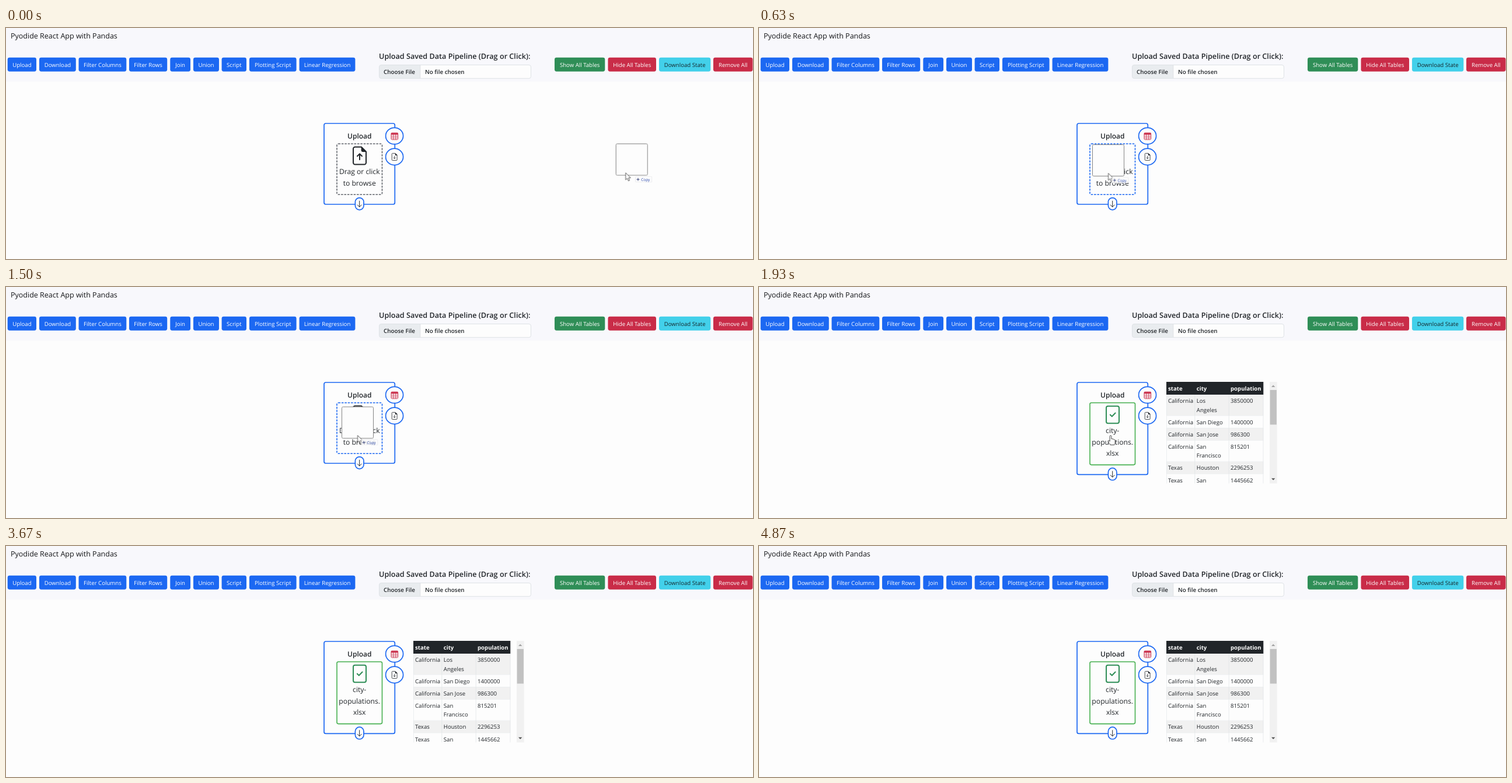
An HTML page that plays this animation: 1280 by 397 pixels, repeating every 4910 ms.

```html
<!DOCTYPE html>
<html lang="en">
<head>
<meta charset="utf-8">
<title>Data pipeline upload</title>
<style>
  html, body { margin: 0; width: 100%; height: 100%; overflow: hidden; background: #fdfdfd; }
  svg { display: block; width: 100%; height: 100%; }
  svg { --blue: #1c68f2; --green: #2f8e57; --red: #c92c48; --cyan: #42d0ea; --ink: #212529; --paper: #fdfdfd; }
  text { font-family: "Open Sans", "Noto Sans", sans-serif; fill: var(--ink); text-rendering: geometricPrecision; white-space: pre; }
  .mid { text-anchor: middle; }
  .semi { font-weight: 600; }
  .card-text { font-size: 12.15px; }
  .small { font-size: 9.65px; }
  .outline { fill: var(--paper); stroke: var(--blue); stroke-width: 1.7; }
  .line { fill: none; stroke: currentColor; stroke-linecap: round; stroke-linejoin: round; }
  .drop { fill: none; stroke-width: 1.6; }

  .before, .after, .zone, .ghost, .pointer, .arrow, .hand { animation: 4910ms infinite; }
  .before { animation-name: before; animation-timing-function: step-end; }
  .after  { animation-name: after;  animation-timing-function: step-end; }
  .zone   { animation-name: zone;   animation-timing-function: step-end; }
  .arrow  { animation-name: arrow;  animation-timing-function: step-end; }
  .hand   { animation-name: hand;   animation-timing-function: step-end; }
  .ghost  { animation-name: ghost; }
  .pointer { animation-name: pointer; }

  @keyframes before { 0% { opacity: 1 } 31.9%, 100% { opacity: 0 } }
  @keyframes after  { 0% { opacity: 0 } 31.9%, 100% { opacity: 1 } }
  @keyframes zone   { 0% { stroke: #62666d } 7.1%, 100% { stroke: #1c68f2 } }
  @keyframes arrow  { 0% { opacity: 1 } 31.9% { opacity: 0 } 68.9%, 100% { opacity: 1 } }
  @keyframes hand   { 0% { opacity: 0 } 31.9% { opacity: 1 } 68.9%, 100% { opacity: 0 } }
  @keyframes ghost {
    0% { transform: translate(1045px, 198.5px); animation-timing-function: cubic-bezier(.35, .12, .25, 1) }
    11.7%, 13% { transform: translate(571px, 200px); animation-timing-function: ease-in-out }
    30%, 100% { transform: translate(575px, 205.5px) }
  }
  @keyframes pointer {
    0% { transform: translate(1062px, 248.7px); animation-timing-function: cubic-bezier(.35, .12, .25, 1) }
    11%, 12.8% { transform: translate(598.5px, 249.5px); animation-timing-function: ease-in-out }
    29.5%, 39.5% { transform: translate(602.5px, 255px); animation-timing-function: ease-in-out }
    59.5%, 66.4% { transform: translate(602.5px, 252.7px); animation-timing-function: ease-in }
    73.3%, 100% { transform: translate(618px, -30px) }
  }
</style>
</head>
<body>
<svg viewBox="0 0 1280 397" preserveAspectRatio="none">
  <defs>
    <clipPath id="view"><rect x="698" y="163" width="167" height="174.5"/></clipPath>
    <g id="pill">
      <rect class="outline" x="598.4" y="291.8" width="14.6" height="20.8" rx="7.3"/>
      <path class="line" d="M605.7 297.3v10M602.2 304l3.5 3.5 3.5-3.5"/>
    </g>
    <g id="sheet">
      <path class="line" d="M9.5 .5H4A1.5 1.5 0 0 0 2.5 2v12A1.5 1.5 0 0 0 4 15.5h8a1.5 1.5 0 0 0 1.5-1.5V4.5z"/>
      <path fill="currentColor" d="M9.3 .2 14 4.8h-3.2a1.5 1.5 0 0 1-1.5-1.5z"/>
    </g>
  </defs>

  <rect width="1280" height="397" fill="#fdfdfd"/>
  <rect width="1280" height="92" fill="#f8f8fc"/>
  <text x="8" y="17.6" font-size="12.5" style="fill:#141517">Pyodide React App with Pandas</text>
  <g id="buttons"></g>

  <text class="semi" x="639" y="53.3" font-size="12.65">Upload Saved Data Pipeline (Drag or Click):</text>
  <rect x="639.5" y="63.5" width="260" height="23.2" rx="3.5" fill="#fdfdfd"/>
  <path d="M710 63.5H643a3.5 3.5 0 0 0-3.5 3.5v16.2a3.5 3.5 0 0 0 3.5 3.5h67z" fill="#e9ecef"/>
  <path d="M709.8 63.5v23.2" stroke="#dee2e6"/>
  <rect x="639.5" y="63.5" width="260" height="23.2" rx="3.5" fill="none" stroke="#dee2e6"/>
  <text class="semi" x="647" y="79" font-size="9.85">Choose File</text>
  <text class="semi" x="718" y="79" font-size="9.9">No file chosen</text>

  <g class="before">
    <rect class="outline" x="545" y="164" width="121.3" height="139" rx="3"/>
    <rect class="drop zone" x="567" y="199" width="77.5" height="87.3" rx="2.5" stroke-dasharray="3.6 1.8"/>
    <g transform="translate(590 203.5) scale(2)" color="#212529">
      <use href="#sheet"/>
      <path class="line" d="M8 11.4V6.5M6 8.4l2-2 2 2"/>
    </g>
    <text class="mid card-text" x="605.7" y="251.3">Drag or click</text>
    <text class="mid card-text" x="605.7" y="270.5">to browse</text>
    <use href="#pill" color="#212529"/>
  </g>

  <g class="after">
    <rect class="outline" x="545" y="164" width="121.3" height="158.4" rx="3"/>
    <rect class="drop" x="567" y="199" width="77.5" height="106.6" rx="2.5" stroke="#46b04f"/>
    <g class="line" color="#2f8e57" stroke-width="2">
      <rect x="595" y="204.8" width="22" height="29.4" rx="3"/>
      <path d="M601.8 219.5l3 3 5.8-6"/>
    </g>
    <text class="mid card-text" x="605.7" y="251.3">city-</text>
    <text class="mid card-text" x="605.7" y="270.5">populations.</text>
    <text class="mid card-text" x="605.7" y="289.6">xlsx</text>
    <use href="#pill" y="19.4" color="#212529"/>

    <g id="table" clip-path="url(#view)"></g>
    <rect x="875" y="163" width="12.6" height="174.5" fill="#f1f1f1"/>
    <rect x="875.7" y="177" width="11.2" height="59.5" fill="#c1c1c1"/>
    <path d="M878 172l3.2-3.4 3.2 3.4z" fill="#a3a3a3"/>
    <path d="M878 328.7l3.2 3.4 3.2-3.4z" fill="#505050"/>
  </g>

  <text class="mid semi" x="605.8" y="190.3" font-size="12">Upload</text>
  <ellipse class="outline" cx="665.6" cy="185.5" rx="15" ry="14.2"/>
  <ellipse class="outline" cx="665.6" cy="221.4" rx="15" ry="14.2"/>
  <g fill="none" stroke="#c92c48">
    <rect x="660" y="180.2" width="11.6" height="11.6" rx="1.3"/>
    <path d="M660 182h11.6" stroke-width="2.8"/>
    <path d="M660 186h11.6M660 189h11.6M663.8 182v9.8M667.8 182v9.8" stroke-width=".8"/>
  </g>
  <g transform="translate(659.2 215) scale(.81)" color="#212529">
    <use href="#sheet"/>
    <path class="line" d="M8 6.6v5M6 9.8l2 2 2-2"/>
  </g>

  <g class="before">
    <g class="ghost">
      <rect x=".5" y=".5" width="54" height="54" rx="2" fill="#fdfdfd" stroke="#858585"/>
    </g>
  </g>
  <g class="pointer">
    <path class="arrow" d="M0 0V12.2L2.8 9.6 4.7 14 6.8 13.1 4.9 8.8H8.6Z" fill="#fff" stroke="#333" stroke-width=".8"/>
    <path class="hand" d="M-1.4 1.6Q-1.4 .3 0 .3T1.4 1.6V6Q3.5 5.2 4 6.6 5.6 6 6 7.3 7.7 7 7.7 8.8V12Q7.5 14 6.3 16.4H-.6Q-1.4 14.4-3.6 11.6-5 9.8-4 9-3 8.4-1.4 10.3Z" fill="#fff" stroke="#333" stroke-width=".9"/>
  </g>
  <g class="before">
    <g class="ghost">
      <rect x="34" y="56.7" width="28" height="9.8" rx="1" fill="#fdfdfd" fill-opacity=".85" stroke="#e2e2e6" stroke-width=".7"/>
      <path d="M35.8 61.7h5M38.3 59.2v5" stroke="#26336f" stroke-width=".9"/>
      <text x="43.5" y="64" font-size="6.5" style="fill:#2442a8">Copy</text>
    </g>
  </g>
</svg>
<script>
  const make = (parent, tag, attrs, label) => {
    const el = document.createElementNS('http://www.w3.org/2000/svg', tag);
    for (const key in attrs) el.setAttribute(key, attrs[key]);
    if (label) el.textContent = label;
    document.getElementById(parent).append(el);
  };

  // label, left, right, fill, text colour
  const buttons = [
    ['Upload', 2.7, 52], ['Download', 57, 119.8], ['Filter Columns', 124.5, 206.3],
    ['Filter Rows', 211, 276.2], ['Join', 281.3, 316], ['Union', 321, 365],
    ['Script', 369.6, 412], ['Plotting Script', 417, 497.6], ['Linear Regression', 502.6, 598.4],
    ['Show All Tables', 940, 1026.3, 'green'], ['Hide All Tables', 1031.5, 1114, 'red'],
    ['Download State', 1119, 1207.3, 'cyan', '#15262b'], ['Remove All', 1212, 1279.5, 'red']
  ];
  for (const [label, left, right, hue = 'blue', ink = '#fff'] of buttons) {
    make('buttons', 'rect', { x: left, y: 50.7, width: right - left, height: 24, rx: 3.4, fill: `var(--${hue})` });
    make('buttons', 'text', { class: 'mid small', x: (left + right) / 2, y: 66.6, style: `fill:${ink}` }, label);
  }

  const cols = [701, 749.8, 808];
  const edges = [698.3, 746.8, 805.2, 864];
  const rows = [
    ['California', 'Los|Angeles', '3850000'], ['California', 'San Diego', '1400000'],
    ['California', 'San Jose', '986300'], ['California', 'San|Francisco', '815201'],
    ['Texas', 'Houston', '2296253'], ['Texas', 'San|Antonio', '1445662']
  ];
  make('table', 'rect', { x: 698, y: 163, width: 166.3, height: 22, fill: '#212529' });
  ['state', 'city', 'population'].forEach((name, i) =>
    make('table', 'text', { class: 'small', x: cols[i], y: 178, 'font-weight': 700, style: 'fill:#fff' }, name));

  let rowY = 185;
  rows.forEach((row, n) => {
    const height = row[1].includes('|') ? 36.4 : 21.2;
    const rules = `M698 ${rowY + height}h166.3` + edges.map(x => `M${x} ${rowY}v${height}`).join('');
    make('table', 'rect', { x: 698, y: rowY, width: 166.3, height, fill: n % 2 ? '#fdfdfd' : '#f1f1f1' });
    make('table', 'path', { d: rules, stroke: '#dee2e6', 'stroke-width': .7 });
    row.forEach((cell, i) => cell.split('|').forEach((part, k) =>
      make('table', 'text', { class: 'small', x: cols[i], y: rowY + 14.2 + k * 15.4 }, part)));
    rowY += height;
  });
</script>
</body>
</html>
```
